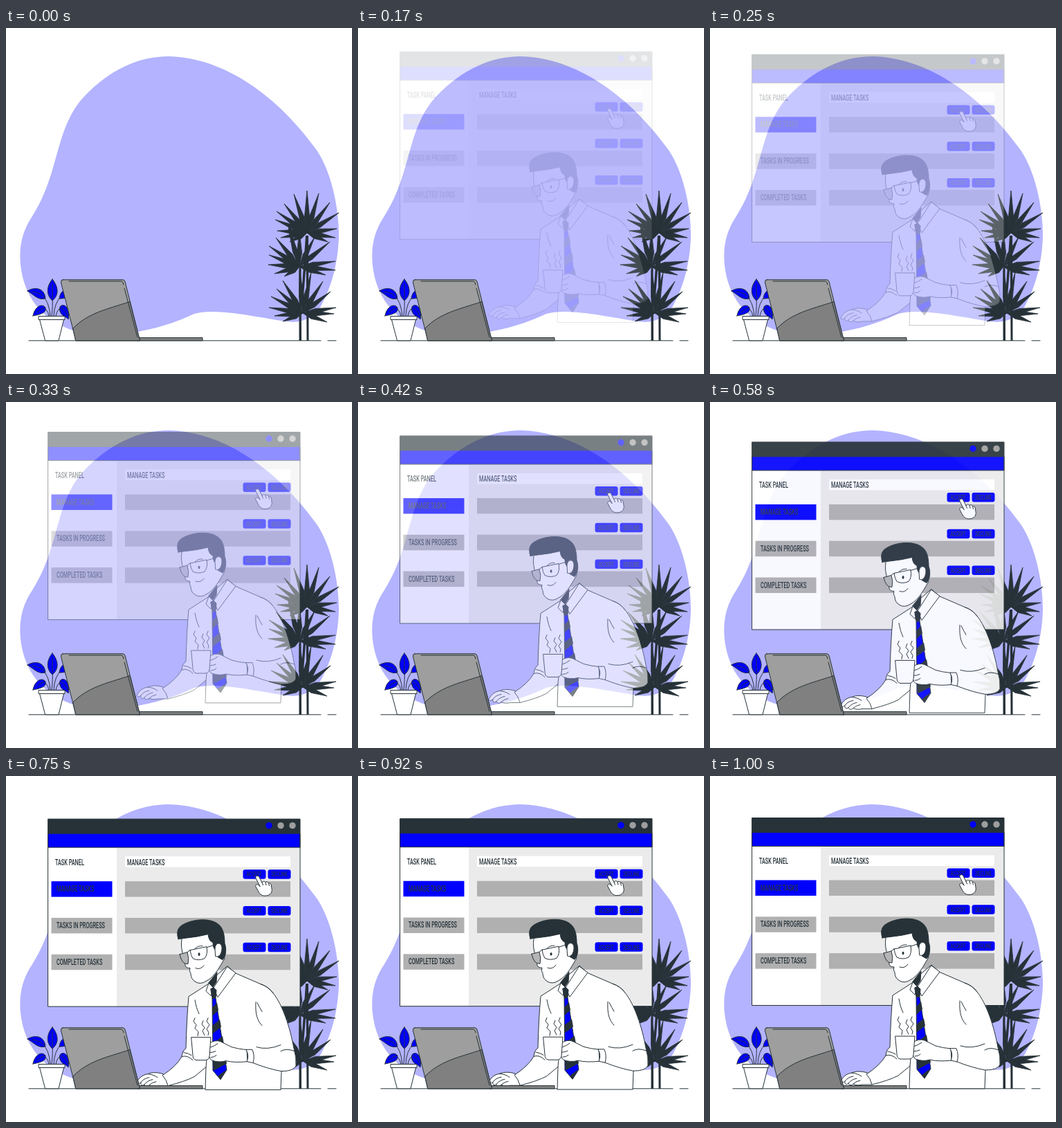
An HTML page that plays this animation: 500 px wide and 500 px high, repeating every 1.04 s.

```html
<!DOCTYPE html>
<html lang="en">
<head>
<meta charset="utf-8">
<title>Task manager</title>
<style>
  html, body { margin: 0; width: 100%; height: 100%; overflow: hidden; background: #fff; }
  svg { display: block; width: 100vw; height: 100vh; }
  text { font-family: Roboto, "Liberation Sans", sans-serif; fill: #263238; }
  .ink { fill: #263238; }
  .blue { fill: #00f; }
  .white { fill: #fff; }
  .line { stroke: #263238; stroke-width: 1; stroke-linejoin: round; stroke-linecap: round; }
  .none { fill: none; }
</style>
</head>
<body>
<svg viewBox="0 0 500 500">
  <path fill="#b3b3ff" d="M235 41C305 42 385 87 450 178C471 211 481 260 481 300C480 340 470 375 455 402C438 428 415 426 398 423C360 417 300 404 272 413C240 428 200 441 150 443C88 447 35 415 23 355C16 318 24 293 38 272C78 210 70 145 113 99C150 60 192 41 235 41Z"/>
  <path class="line none" d="M33 451.8H455M465 451.8H477"/>

  <g id="potted" class="line">
    <path class="none" d="M66 416Q68 400 67 390M64 416Q62 394 53 388M62 416Q60 405 52 404M69 416Q70 396 80 388M72 416Q74 406 80 404"/>
    <g class="blue">
      <path d="M67 363C76 374 77 386 67 394C58 386 58 374 67 363Z"/>
      <path d="M31 380C42 373 56 376 57 391C46 394 40 385 31 380Z"/>
      <path d="M39 416C41 403 52 397 57 404C59 412 49 414 39 416Z"/>
      <path d="M77 391C78 380 86 375 98 378C94 386 88 392 77 391Z"/>
      <path d="M78 409C75 400 84 398 88 404C91 410 91 416 90 421C85 415 80 417 78 409Z"/>
    </g>
    <path class="none" d="M67 370V392M38 381Q50 382 56 390M45 411Q51 405 56 404M79 404Q86 407 89 416"/>
    <path class="white" d="M49 421.5H83.5L76 451.8H57ZM47.5 416.5H85V421.5H47.5Z"/>
  </g>

  <g id="palm" class="ink">
    <path d="M423.5 345H426.5L427 452H423.5ZM433.5 300H437L437.5 452H434.5ZM408 290L412 288L424 345H421ZM433 300H437L429 400H426Z"/>
  </g>

  <g id="scene" opacity="0">
    <g id="window">
      <rect x="61" y="60.5" width="364" height="271" fill="#ebebeb"/>
      <rect class="white" x="61" y="102" width="99" height="229.5"/>
      <rect class="ink" x="61" y="60.5" width="364" height="21.5"/>
      <rect class="blue line" x="61" y="81.5" width="364" height="20"/>
      <rect class="line none" x="61" y="60.5" width="364" height="271"/>
      <circle class="blue" cx="380" cy="70" r="4.7"/>
      <g fill="#9e9e9e"><circle cx="397" cy="70" r="4.7"/><circle cx="414" cy="70" r="4.7"/></g>
      <rect class="white" x="172" y="114.5" width="239" height="15.5"/>
    </g>

    <g id="pointer" class="line">
      <path class="white" d="M360.8 145.5C360 142.500 364.500 141.500 366 144.500L370 152.500C371 150 374 150 375 152C377 150.500 379 151.500 379.500 153.500C381 152.500 383 154 383.300 156L384.300 163C384 168.500 380 171.500 374 171.500C369 171.500 366 168 364 164L360.800 158C360.500 155 363.500 154 365 156L367 158Z"/>
      <path class="none" d="M370 152.500L371.500 156M375 152L376 156M379.500 153.500L380.500 157"/>
    </g>

    <g id="man" class="line">
      <path class="white" d="M232 431C222 426 211 426 205 429C197 430 192 435 189 441C190 444 193 443 195 441C194 445 197 447 200 444C201 448 205 447 207 445Q212 448 220 446L234 446Z"/>
      <path class="none" d="M195 441Q199 435 207 434M200 444Q205 438 212 437M207 445Q211 441 217 440M205 429Q214 430 219 434"/>
      <path class="white" d="M292 299L264 317Q261 350 260 392Q255 395 254 404Q246 418 226 431Q232 437 234 446Q258 440 272 433L289 419L288 451.800H397L398 425Q416 425 419 417Q420 405 416 392C410 360 400 330 386 312Q378 302 368 299L331 283L320 273L300 290Z"/>
      <path class="none" d="M289 419Q291 400 290 388M254 404Q262 401 270 409M257 398Q264 399 268 402M273 322Q275 334 279 342M361 325C360 342 363 352 370 359M368 299Q380 303 386 312M362 390Q378 395 397 387M417 396Q405 391 397 396M357 413Q380 422 398 425M363 326Q367 334 370 339"/>
      <path class="ink" d="M293 297L305 282L304 296L298 305Z"/>
      <path class="white" d="M293 298L289 309L296 316L300 305ZM320 274L332 283L306 318L300 305Z"/>

      <path class="blue" d="M296 306L300 304L304 308L303 319L319 423L310 437L299 424L298 319Z"/>
      <path class="ink" stroke="none" d="M296 306L300 304L304 308L303 319L298 321ZM298 333L305 326L307 337L298 345ZM298 359L309 350L311 361L298 371ZM299 385L313 374L315 386L299 398ZM299 411L317 402L319 414L300 424ZM306 432L319 422L310 437Z"/>

      <path class="white" d="M254 234Q252 247 257 260L259 272Q260 276 266 276Q264 280 267 284Q267 292 274 296Q281 300 289 295Q299 290 307 277L316 262L312 239L300 222L270 222Z"/>
      <path class="ink" d="M249 234C246 224 248 217 256 213C272 204 296 204 306 212C314 217 316 229 316 240C319 248 318 259 313 264L306 260Q310 244 303 242L303 250Q299 247 299 239Q293 237 292 227Q276 231 264 232Q255 233 249 234Z"/>
      <path class="white" d="M302 248C302 238 312 238 312 247C312 255 308 261 303 259Z"/>
      <path fill="#b5b5b5" d="M251 256L262 253Q265 262 263 270Q254 271 251 256Z"/>
      <path class="none" d="M266 250L290 245Q292 256 287 262Q278 266 270 262Q267 258 266 250ZM262 253L266 250M290 246L303 242M274 276Q281 279 286 272M273 248Q278 243 284 244"/>
      <ellipse class="ink" stroke="none" cx="279" cy="256" rx="1.5" ry="2.300"/>

      <path class="white" d="M293 385Q302 379 310 382L326 390Q336 393 348 394L349 411Q330 413 318 410Q307 413 297 409Q292 405 294 400Z"/>
      <path class="none" d="M294 391Q301 389 306 385M294 398Q299 398 303 396M296 405Q301 405 304 402"/>
      <path class="white" d="M347 394Q352 402 348 411L357 413Q360 403 356 394Z"/>
      <path class="white" d="M268 376H296L294 403Q293 409 288 409H275Q270 408 270 402Z"/>
      <path class="none" d="M273 348L271 353L275 358L273 363L278 368L277 374M285 352L283 357L287 362L284 367L287 373M292 348L290 353L294 358L290 364L293 369L292 373"/>
    </g>
  </g>

  <g id="laptop" class="line">
    <rect x="190" y="447.500" width="94" height="4.300" fill="#808080"/>
    <path fill="#9e9e9e" d="M82 363.800H169Q171.500 364 172.200 367L193.500 451.800H101L79.500 368Q79 364 82 363.800Z"/>
    <path fill="#808080" d="M97 434C118 412 144 407 179 395.500L193.500 451.800H101Z"/>
    <path class="none" d="M91 366H167Q169 366 170 371M171 376L190 447"/>
  </g>
</svg>
<script>
const $ = id => document.getElementById(id);

function add(parent, tag, attrs, content = "") {
  const el = document.createElementNS("http://www.w3.org/2000/svg", tag);
  for (const key in attrs) el.setAttribute(key, attrs[key]);
  el.textContent = content;
  parent.appendChild(el);
}

// One condensed cut for every label.
function label(x, y, content, size = 12) {
  add($("window"), "text", { transform: `translate(${x} ${y}) scale(.61 1)`, "font-size": size, "font-weight": 500 }, content);
}

function box(x, y, width, height, fill, rx = 0) {
  add($("window"), "rect", { x, y, width, height, fill, rx });
}

function fan(cx, cy, tips) {
  const d = tips.split(" ").map(tip => {
    const [x, y] = tip.split(",").map(Number);
    const dx = x - cx, dy = y - cy, len = Math.hypot(dx, dy);
    const mx = cx + dx * .38, my = cy + dy * .38;
    const nx = -dy / len * 3.6, ny = dx / len * 3.6;
    return `M${cx} ${cy}L${mx + nx} ${my + ny}L${x} ${y}L${mx - nx} ${my - ny}Z`;
  }).join("");
  add($("palm"), "path", { d, stroke: "#263238", "stroke-width": .8 });
}

fan(435, 296, "435,235 416,240 402,254 391,265 389,277 392,293 397,303 410,309 452,239 468,252 481,267 478,290 476,303 465,309");
fan(424, 345, "408,287 390,303 380,315 380,328 379,342 388,355 402,359 424,293 446,302 468,309 476,337 476,350 462,357");
fan(429, 412, "424,350 400,365 391,377 383,388 380,404 388,416 400,424 441,353 458,366 469,381 477,404 474,413 464,425");

label(71, 127, "TASK PANEL");
label(175, 127, "MANAGE TASKS");
["MANAGE TASKS", "TASKS IN PROGRESS", "COMPLETED TASKS"].forEach((name, row) => {
  const y = 150.5 + row * 52.8;
  box(65.5, y, 88, 22.5, row ? "#b0b0b0" : "#00f");
  label(73, y + 15, name);
  box(172, y, 239, 22.5, "#b0b0b0");
  ["ACCEPT", "DECLINE"].forEach((action, col) => {
    const x = 342.5 + col * 36;
    box(x, y - 17, 33, 13.5, "#00f", 3);
    label(x + 5, y - 6.7, action, 9.6);
  });
});

const bezier = (s, a, b) => 3 * (1 - s) ** 2 * s * a + 3 * (1 - s) * s * s * b + s ** 3;

// Timing curve (.36, -.01, .5, 1.38), solved by bisection.
function ease(x) {
  let lo = 0, hi = 1;
  for (let i = 0; i < 30; i++) {
    const mid = (lo + hi) / 2;
    if (bezier(mid, .36, .5) < x) lo = mid; else hi = mid;
  }
  return bezier(lo, -.01, 1.38);
}

const LOOP = 1040, FPS = 24, DROP = 30;

function draw(ms) {
  const step = Math.min(24, Math.floor((ms % LOOP + 4) * FPS / 1000));
  const progress = step < 2 ? 0 : ease(Math.min(1, step / FPS + .02));
  $("scene").setAttribute("opacity", Math.max(0, Math.min(1, progress)));
  $("scene").setAttribute("transform", `translate(0 ${DROP * (progress - 1)})`);
}

const start = performance.now();
function tick() {
  draw(performance.now() - start);
  requestAnimationFrame(tick);
}
draw(0);
requestAnimationFrame(tick);
</script>
</body>
</html>
```
